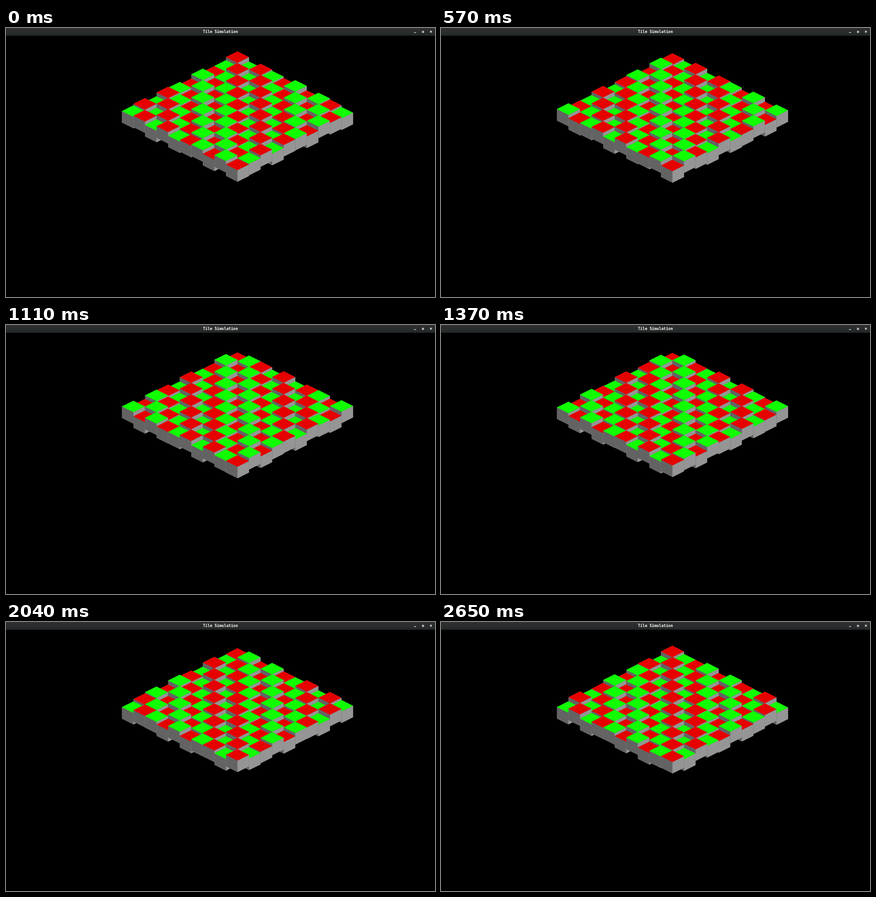
Animation of 944x593 px, one loop 2.68 s. Source, as an HTML page:

```html
<!DOCTYPE html>
<html lang="en">
<head>
<meta charset="utf-8">
<title>Tile Simulation</title>
<style>
  html, body { margin: 0; width: 100%; height: 100%; overflow: hidden; background: #000; }
  svg { display: block; width: 944px; height: 593px; }
  text { font: bold 8.55px "DejaVu Sans Mono", monospace; fill: #fff; white-space: pre; }
</style>
</head>
<body>
<svg viewBox="0 0 944 593" xmlns="http://www.w3.org/2000/svg">
  <defs>
    <linearGradient id="bar" x1="0" y1="0" x2="0" y2="1">
      <stop offset="0" stop-color="#30312f"/>
      <stop offset="1" stop-color="#22282a"/>
    </linearGradient>
  </defs>
  <rect width="944" height="593" fill="#000"/>
  <g id="board"></g>
  <rect width="944" height="17" fill="url(#bar)"/>
  <text x="471.8" y="11" text-anchor="middle">Tile Simulation</text>
  <g fill="none" stroke="#f4f4f4" stroke-width="1.3">
    <path d="M898 10H902.3"/>
    <rect x="916.2" y="7.2" width="2.7" height="2.7"/>
    <path d="M933.1 6.3l3.8 3.8m0-3.8l-3.8 3.8"/>
  </g>
</svg>
<script>
const LOOP = 2680, STEP = 33.52;
const SIZE = 10, HALF_W = 25.44, HALF_H = 12.72, DEPTH = 25.44;
const TOP_X = 509.3, TOP_Y = 56.3;
const SWING = 5.1, SPEED = 2, START = 0.34, PHASE_I = 2.5, PHASE_J = -2.3;
const RED = '#e60000', GREEN = '#10ff00', DARK = '#636363', LIGHT = '#959595';

const board = document.getElementById('board');
const tiles = [];

function add(parent, name, attrs) {
  const el = document.createElementNS('http://www.w3.org/2000/svg', name);
  for (const key in attrs) el.setAttribute(key, attrs[key]);
  return parent.appendChild(el);
}

function face(parent, fill, ...points) {
  add(parent, 'polygon', { points: points.join(' '), fill });
}

function addTile(i, j) {
  const g = add(board, 'g', {});
  const w = HALF_W, h = HALF_H, d = DEPTH;
  // the dark shape spans the whole block so that no seams show
  face(g, DARK, [0, 0], [w, h], [w, h + d], [0, 2 * h + d], [-w, h + d], [-w, h]);
  face(g, LIGHT, [0, 2 * h], [w, h], [w, h + d], [0, 2 * h + d]);
  face(g, (i + j) % 2 ? GREEN : RED, [0, 0], [w, h], [0, 2 * h], [-w, h]);
  tiles.push({
    g,
    x: TOP_X + (i - j) * w,
    y: TOP_Y + (i + j) * h,
    phase: START + PHASE_I * i + PHASE_J * j
  });
}

// back to front
for (let sum = 0; sum <= 2 * SIZE - 2; sum++)
  for (let i = 0; i < SIZE; i++)
    if (sum - i >= 0 && sum - i < SIZE) addTile(i, sum - i);

// start of the n-th step, on a 10 ms clock
const stepStart = n => Math.round(n * STEP / 10) * 10;

function draw(ms) {
  const t = ms % LOOP;
  let n = Math.floor(t / STEP) + 1;
  while (n > 0 && stepStart(n) > t) n--;
  const angle = SPEED * n * STEP / 1000;
  for (const { g, x, y, phase } of tiles) {
    const lift = SWING * Math.cos(phase + angle);
    g.setAttribute('transform', `translate(${x.toFixed(2)} ${(y - lift).toFixed(2)})`);
  }
}

const begin = performance.now();
function tick() {
  draw(performance.now() - begin);
  requestAnimationFrame(tick);
}
tick();
</script>
</body>
</html>
```
